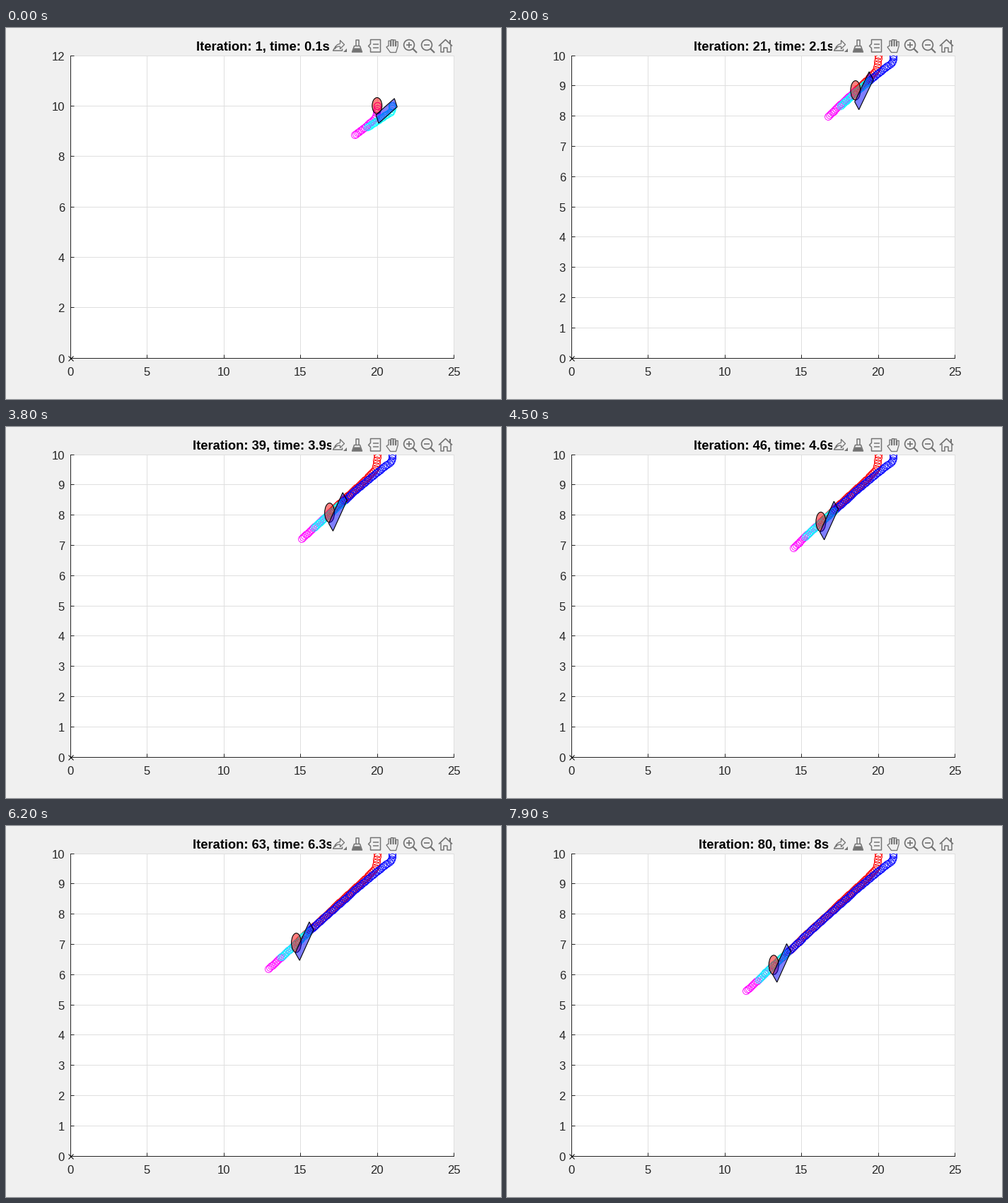
A matplotlib script for the animation above (8 s loop, 700x525 px).

```python
import numpy as np
import matplotlib.pyplot as plt
from matplotlib.animation import FuncAnimation
from matplotlib.patches import Circle, Polygon, Rectangle

W, H, DPI = 700, 525, 100
FRAMES, HORIZON = 80, 20
PX = 72 / DPI  # points per pixel
GRAY, DARK, GRID, PANEL = "#737373", "#262626", "#dfdfdf", "#f0f0f0"
LEFT, BOTTOM, WIDTH, HEIGHT = 90.75, 466.5, 542.5, 427.875
RIGHT, TOP = LEFT + WIDTH, BOTTOM - HEIGHT
ICON_Y = 25.5

plt.rcParams["font.family"] = "Liberation Sans"


def travel(start, heading, step):
    """Positions reached by moving along headings measured from straight down."""
    a = np.radians(heading)
    moves = -np.column_stack([np.sin(a), np.cos(a)]) * step.reshape(-1, 1)
    return np.vstack([start, start + np.cumsum(moves, axis=0)])


n = np.arange(FRAMES + HORIZON)
lead = travel((20, 10), np.minimum(8.8 * n, 64.6), np.full(n.size, 0.1))
settle = 3.4 * (1 - np.exp(-np.maximum(n - 12, 0) / 23))
follow = travel((21, 10), np.minimum(17 * n, 68) - settle,
                np.minimum(0.06 + 0.01 * n, 0.1))

fig = plt.figure(figsize=(W / DPI, H / DPI), dpi=DPI, facecolor=PANEL)

# Layer in pixel coordinates: background, texts, toolbar
page = fig.add_axes([0, 0, 1, 1], zorder=0)
page.set(xlim=(0, W), ylim=(H, 0))
page.axis("off")
page.add_patch(Rectangle((LEFT, TOP), WIDTH, HEIGHT, fc="white", lw=0))
page.plot([LEFT, RIGHT, RIGHT], [TOP, TOP, BOTTOM], color=GRID, lw=PX)
title = page.text(363, 32, "", ha="center", va="baseline", weight="bold",
                  fontsize=18.33 * PX, color="black", zorder=3)


def y_labels(top, step):
    return [page.text(83, BOTTOM + 1 - HEIGHT * v / top, str(v), ha="right",
                      va="center_baseline", fontsize=16.67 * PX, color=DARK)
            for v in range(0, top + 1, step)]


scales = {12: (2, y_labels(12, 2)), 10: (1, y_labels(10, 1))}


def stroke(x, points, width=1.5):
    """Polyline around the centre of an icon."""
    px, py = np.transpose(points)
    page.plot(x + px, ICON_Y + py, color=GRAY, lw=width * PX, zorder=5,
              solid_joinstyle="round", solid_capstyle="butt")


def solid(x, points):
    page.add_patch(Polygon(np.add(points, (x, ICON_Y)), fc=GRAY, lw=0, zorder=5))


def mirrored(half):
    return half + [(-x, y) for x, y in half[::-1]]


def export(x):
    stroke(x, [(-5, 0), (-9, 6.5), (4, 6.5), (4, 4)])
    t = np.linspace(0, np.pi / 2, 8)
    for drop in (0, 3.5):
        stroke(x, np.column_stack([1 - 7 * np.cos(t), 4 - (7 - drop) * np.sin(t)]), 1.3)
    stroke(x, [(1, -3), (1, -8), (7, -2), (1, 4), (1, 0.5)], 1.3)
    solid(x, [(5, 8.5), (10, 8.5), (10, 3.5)])


def brush(x):
    stroke(x, mirrored([(-2, 0), (-2, -9)]))
    stroke(x, mirrored([(0, 0), (-4, 0), (-7, 8.5)]))
    solid(x, mirrored([(-4.5, 3), (-6.5, 8.5)]))


def data_tip(x):
    stroke(x, [(-6, -3), (-6, -9), (8, -9), (8, 8.5), (-6, 8.5), (-6, 3),
               (-9, 0), (-6, -3)])
    for y in (-3, 2):
        stroke(x, [(-2.5, y), (5, y)])


def hand(x):
    outline = [(-3, 9), (-8.5, 1.5), (-6.5, 0)]
    for j in range(4):
        left, tip = -5.5 + 3.5 * j, -9 + (j - 1.3) ** 2
        outline += [(left, 0), (left, tip), (left + 2.7, tip), (left + 2.7, 0)]
    stroke(x, outline + [(5, 9), (-3, 9)], 1.3)


def magnifier(x, plus):
    page.add_patch(Circle((x - 1.5, ICON_Y - 1.5), 7.4, fc="none", ec=GRAY,
                          lw=1.7 * PX, zorder=5))
    stroke(x, [(3.7, 3.7), (9.5, 9.5)], 2.2)
    stroke(x, [(-5.5, -1.5), (2.5, -1.5)], 1.7)
    if plus:
        stroke(x, [(-1.5, -5.5), (-1.5, 2.5)], 1.7)


def home(x):
    stroke(x, mirrored([(-9.5, 0), (0, -9)]), 1.7)
    stroke(x, mirrored([(-7, -2), (-7, 8.5), (-2.2, 8.5), (-2.2, 2.5)]))
    stroke(x, [(6, -9), (6, -3.5)], 2)


page.add_patch(Rectangle((459.5, 13), 175, 25, fc=PANEL, lw=0, zorder=4))
icons = (export, brush, data_tip, hand, lambda x: magnifier(x, True),
         lambda x: magnifier(x, False), home)
for j, icon in enumerate(icons):
    icon(471.5 + 25 * j)

# Plot
ax = fig.add_axes([LEFT / W, 1 - BOTTOM / H, WIDTH / W, HEIGHT / H], zorder=1)
ax.patch.set_visible(False)
ax.set_axisbelow(True)
ax.set_xlim(0, 25)
ax.set_xticks(range(0, 26, 5))
ax.grid(color=GRID, lw=PX)
ax.spines[["left", "bottom"]].set(color=DARK, linewidth=PX)
ax.spines[["top", "right"]].set_visible(False)
ax.tick_params(direction="in", length=5.4 * PX, width=PX, color=DARK,
               labelcolor=DARK, labelsize=16.67 * PX, labelleft=False)
ax.tick_params(axis="x", pad=13 * PX)
ax.plot(0, 0, "x", color="black", ms=7 * PX, mew=PX, clip_on=False, zorder=6)


def rings(color, z):
    return ax.plot([], [], "o", mfc="none", mec=color, ms=10 * PX,
                   mew=0.9 * PX, zorder=z)[0]


lead_trail, lead_plan = rings("red", 2), rings("magenta", 2.1)
follow_trail, follow_plan = rings("blue", 2.2), rings("cyan", 2.3)
disc = ax.add_patch(Circle((20, 10), 0.32, fc=(1, 0, 0, 0.5), ec="black",
                           lw=1.1 * PX, zorder=4))
car = ax.add_patch(Polygon(np.zeros((4, 2)), fc=(0, 0, 1, 0.5), ec="black",
                           lw=1.1 * PX, zorder=5))


def car_corners(pos, k):
    a = np.radians(48.2 - 19.9 * np.exp(-(k - 1) / 8))
    along = -np.array([np.cos(a), np.sin(a)])
    across = np.array([along[1], -along[0]])
    box = [(-0.25, 0.19), (-0.25, -0.19), (1.12, -0.19), (1.12, 0.19)]
    return [pos + u * along + v * across for u, v in box]


def set_scale(top):
    ax.set_ylim(0, top)
    ax.set_yticks(range(0, top + 1, scales[top][0]))
    for key, (_, labels) in scales.items():
        for label in labels:
            label.set_visible(key == top)


def update(i):
    k = i + 1
    set_scale(12 if k <= 10 else 10)
    title.set_text(f"Iteration: {k}, time: {k / 10:g}s")
    for path, trail, plan in ((lead, lead_trail, lead_plan),
                              (follow, follow_trail, follow_plan)):
        trail.set_data(*path[:k].T)
        plan.set_data(*path[i:k + HORIZON].T)
    disc.center = lead[i]
    car.set_xy(car_corners(follow[i], k))
    return []


anim = FuncAnimation(fig, update, frames=FRAMES, interval=100,
                     init_func=lambda: update(0), repeat=True, repeat_delay=0)
plt.show()
```
